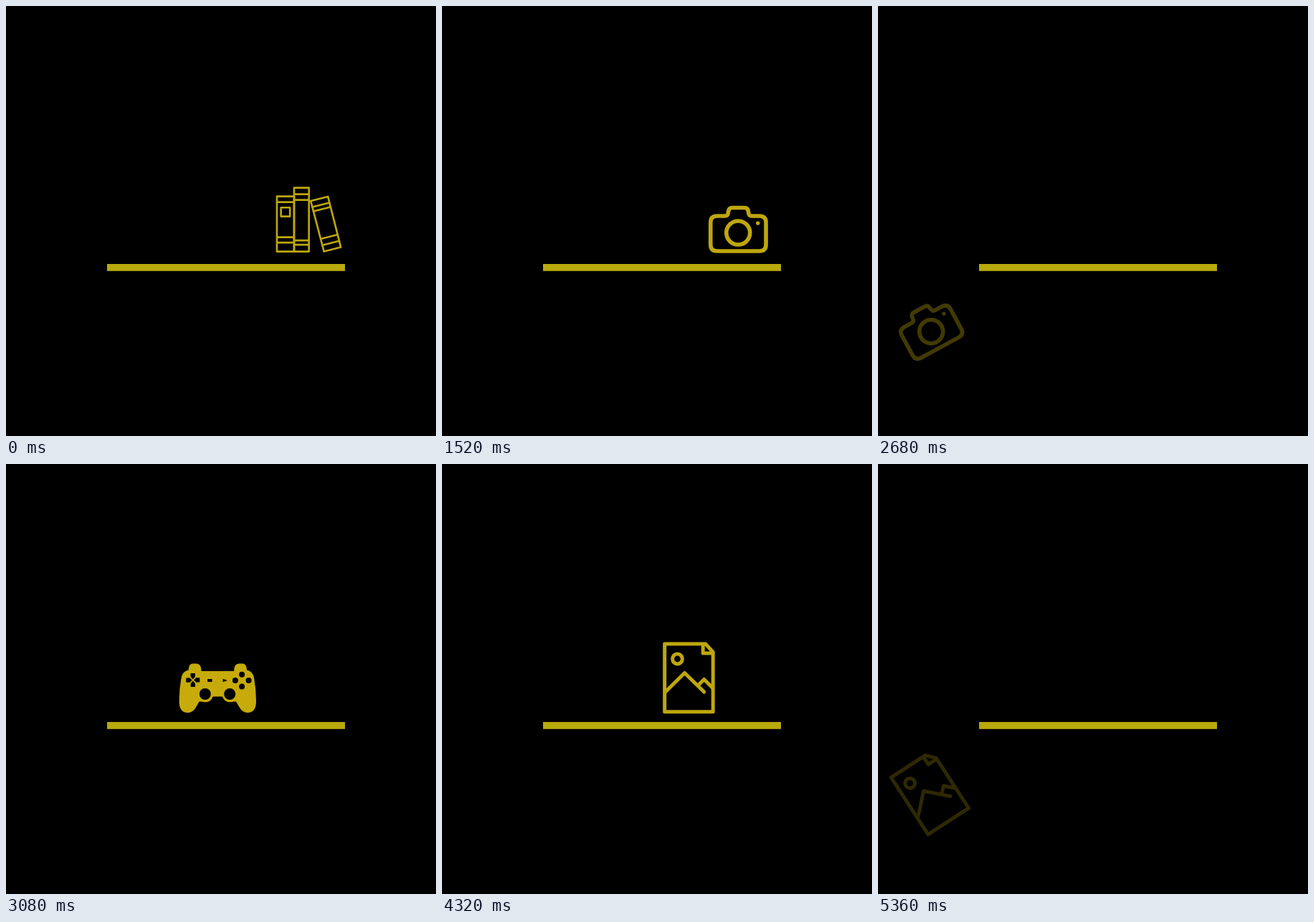
Recreate the animation shown at these times as an HTML page. Size 600x600 px, loop 5400 ms.

```html
<!DOCTYPE html>
<html lang="en">
<head>
<meta charset="utf-8">
<title>Conveyor loader</title>
<style>
  html, body { margin: 0; width: 100%; height: 100%; overflow: hidden; background: #000; }
  svg { display: block; width: 100%; height: 100%; }
  .line { fill: none; stroke: #bea70d; stroke-linejoin: round; stroke-linecap: round; }
  .gold { fill: #c6ab0a; }
</style>
</head>
<body>
<svg viewBox="0 0 600 600">
  <rect width="600" height="600" fill="#000"/>
  <rect x="141" y="360" width="332" height="9.8" fill="#b9aa0c"/>

  <g id="books" class="line" stroke-width="2.6">
    <path d="M105.3 264H129.3V341H105.3ZM105.3 272H129.3M105.3 321H129.3M105.3 328.5H129.3"/>
    <path d="M111 279.7H123.5V292H111Z"/>
    <path d="M129.3 252H150V341H129.3ZM129.3 261H150M129.3 269H150M129.3 325.5H150M129.3 331.5H150"/>
    <path d="M152.5 270.3l24-6 18 70.7-23.5 6Z"/>
    <path d="M154.7 279l23.7-6M156.3 285l23.7-6M166.4 323.4l23.7-6M168.7 332.2l23.7-6"/>
  </g>

  <g id="camera" class="line" stroke-width="5.6">
    <path d="M121 293H132Q136 293 136.5 289L137 286Q137.8 281.5 142 281.5H159.5Q163.7 281.5 164.5 286L165 289
      Q165.5 293 169.5 293H180Q189.3 293 189.3 302V333Q189.3 342 180 342H121Q112 342 112 333V302Q112 293 121 293Z"/>
    <circle cx="150.5" cy="316.5" r="16.5"/>
    <circle cx="178" cy="303" r="2.7" stroke="none" style="fill:#bea70d"/>
  </g>

  <g id="gamepad">
    <g id="half" class="gold">
      <path d="M296 289H273Q273 278.5 266 278.5H261Q255.5 278.5 255 287.5Q247 289 245 298
        Q242 314 242 331Q242 347 254 347Q261 347 265 340L270 331.5H280L289 324.5H296Z"/>
      <circle cx="278.5" cy="321.5" r="10.8"/>
    </g>
    <use href="#half" transform="translate(591.4 0) scale(-1 1)"/>
    <circle cx="278.2" cy="321" r="8"/><circle cx="312.6" cy="321" r="8"/>
    <circle cx="329.5" cy="293.7" r="4"/><circle cx="329.5" cy="310.4" r="4"/>
    <circle cx="320.3" cy="302" r="4"/><circle cx="339" cy="302" r="4"/>
    <path id="pad" d="M258 292H264.3V297L261.2 300.3 258 297Z"/>
    <use href="#pad" transform="rotate(90 261.2 301.5)"/>
    <use href="#pad" transform="rotate(180 261.2 301.5)"/>
    <use href="#pad" transform="rotate(270 261.2 301.5)"/>
    <path d="M281.5 300H288V304H281.5ZM303 299.8L309.3 302 303 304.2Z"/>
  </g>

  <g id="picture" class="line" stroke-width="5">
    <path d="M311 251H368L378.5 262.5V345.7H311ZM364.5 251V264H378.5"/>
    <circle cx="328.8" cy="272" r="6.9"/>
    <path d="M311.5 318.5L338.8 291.5 366 318M357.5 309L366 300.5 377.5 312"/>
  </g>
</svg>
<script>
const LOOP = 5400, FALL_SPEED = 0.53, SPIN = 0.109, FADE = 400;

// center: where the shape is drawn; path: [time, x] points along the shelf, the last one starts the fall
const items = [
  { id: "books",   center: [150, 296.5], path: [[0, 423], [880, 150], [1097, 72]], settle: 1.6 },
  { id: "camera",  center: [150.5, 312], path: [[1490, 425], [1680, 353], [2200, 150.5], [2420, 72]] },
  { id: "gamepad", center: [295.5, 313], path: [[2715, 420], [3080, 295.5], [3600, 102.5], [3682, 72]] },
  { id: "picture", center: [344.5, 298], path: [[4110, 423], [4320, 344.5], [4480, 293], [5058, 72]] }
];
for (const item of items) item.node = document.getElementById(item.id);

function along(path, t) {
  const i = path.findIndex(p => p[0] > t);
  if (i < 0) return path[path.length - 1][1];
  if (i === 0) return path[0][1];
  const [t0, x0] = path[i - 1], [t1, x1] = path[i];
  return x0 + (x1 - x0) * (t - t0) / (t1 - t0);
}

function draw(t) {
  for (const { node, center: [cx, cy], path, settle = 0 } of items) {
    const start = path[0][0], edge = path[path.length - 1][0];
    const fall = Math.max(0, t - edge);
    const visible = t >= start && fall < FADE;
    node.setAttribute("visibility", visible ? "visible" : "hidden");
    if (!visible) continue;
    const dx = along(path, t) - cx;
    const dy = fall * FALL_SPEED + settle * Math.max(0, 1 - (t - start) / 880);
    node.setAttribute("transform", `translate(${dx} ${dy}) rotate(${-fall * SPIN} ${cx} ${cy})`);
    node.setAttribute("opacity", 1 - fall / FADE);
  }
}

const begin = performance.now();
function tick() {
  draw((performance.now() - begin) % LOOP);
  requestAnimationFrame(tick);
}
draw(0);
requestAnimationFrame(tick);
</script>
</body>
</html>
```
